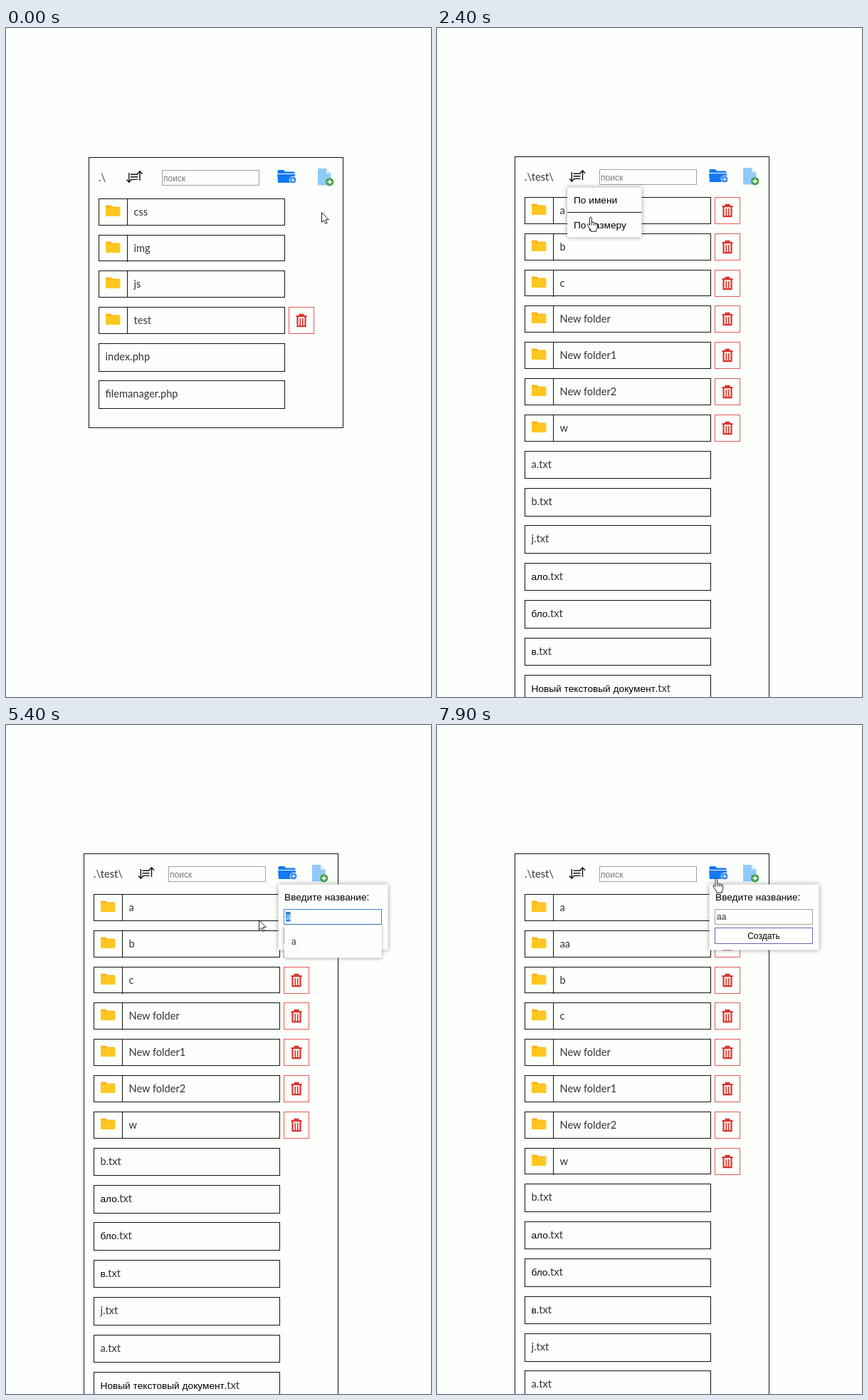
These frames come from a looping animation (597x938 px, 8000 ms). An HTML page:

```html
<!DOCTYPE html>
<html lang="ru">
<head>
<meta charset="utf-8">
<title>File manager</title>
<style>
  html, body { margin: 0; width: 100%; height: 100%; overflow: hidden; background: #fdfffc; }
  svg { display: block; width: 100%; height: 100%; }
  .lat { font: 14.6px Lato, sans-serif; fill: #333; }
  .cyr { font: 13.7px "Liberation Sans", sans-serif; fill: #000; }
  .small { font: 12px "Liberation Sans", sans-serif; fill: #333; }
  .hint { fill: #777; }
  .pop { filter: drop-shadow(0 0 3px #0006); }
  .list { filter: drop-shadow(0 1px 2px #0005); }
</style>
</head>
<body>
<svg viewBox="0 0 597 938">
  <defs>
    <g id="folder">
      <path d="M0 1.5q0-1.5 1.5-1.5h5.5l2 2h9.5q1.5 0 1.5 1.5v9h-20z" fill="#ffb01c"/>
      <path d="M0 4q0-1 1.5-1h17.5q1.5 0 1.5 1v10q0 1.5-1.5 1.5h-17.5q-1.5 0-1.5-1.5z" fill="#ffc720"/>
    </g>
    <g id="trash">
      <rect x=".5" y=".5" width="35" height="37" fill="none" stroke="#e35b56"/>
      <g fill="none" stroke="#d93530" stroke-width="2.2">
        <path d="M10.5 13.2h15M15.5 12v-1.2h5v1.2M12.5 14v13.2h11v-13.2"/>
        <path d="M16.2 16v11M19.8 16v11" stroke-width="1.6"/>
      </g>
    </g>
    <g id="sort" fill="none" stroke="#111" stroke-width="1.4">
      <path d="M3.8 3v13M.5 12.5l3.3 3.7 3.3-3.7M19 14v-13M15.5 4.7l3.5-3.9 3.5 3.9M6 5.2h10M6 8.8h10M6 12.4h10"/>
    </g>
    <g id="newFolder">
      <path d="M.5 2q0-1.5 1.5-1.5h7l2.2 2.5h11.8q1.5 0 1.5 1.5v1h-24z" fill="#1279f2"/>
      <path d="M0 6.5h25l-1 12h-23z" fill="#1279f2"/>
      <circle cx="22" cy="14.6" r="4.9" fill="#2a83ee" stroke="#fff" stroke-width=".9"/>
      <path d="M19.3 14.6h5.4M22 11.9v5.4" stroke="#fff" stroke-width="1.1"/>
    </g>
    <g id="newFile">
      <path d="M0 0h12l6.5 6.5v17h-18.5z" fill="#90caf9"/>
      <path d="M12 0l6.5 6.5h-6.5z" fill="#e1f1fc"/>
      <circle cx="16.7" cy="18.8" r="5.6" fill="#43a047"/>
      <path d="M13.4 18.8h6.6M16.7 15.5v6.6" stroke="#fff" stroke-width="1.8"/>
    </g>
    <path id="arrow" d="M.5.5v14l3.2-3 2.2 5 2.2-1-2.2-4.8h4.4z" fill="#fff" stroke="#222"/>
    <path id="hand" d="M-1.5 11.5V1.5q0-1.5 1.4-1.5t1.4 1.5v6q2.3-1 2.9.6 2-.8 2.6.8 2.4-.4 2.4 1.6v4.2q0 1.6-1.4 3.2v2.3h-7.6v-2.1q-2.3-2.8-4.6-6.4-.8-1.7.7-2.1 1.2 0 2.2 1.9zM1.3 7.5v4M4.2 8.2v3.4M6.8 9v2.8" fill="#fff" stroke="#222"/>
    <path id="beam" d="M-3-6.5h2q1 0 1 1 0-1 1-1h2M0-6v12M-3 6.5h2q1 0 1-1 0 1 1 1h2" fill="none" stroke="#222" stroke-width="1.2"/>
  </defs>
  <g id="scene"></g>
  <use id="cursor"/>
</svg>
<script>
const LOOP = 8000, STEP = 100;
const PAPER = "#fdfffc";
const scene = document.getElementById("scene");
const cursor = document.getElementById("cursor");

const ROOT = {
  x: 117, y: 181, first: 238.8, path: ".\\", bottom: 560,
  sort: 169, input: 219, newFolder: 381, newFile: 438,
  folders: ["css", "img", "js", "test"], locked: ["css", "img", "js"],
  files: ["index.php", "filemanager.php"]
};
const TEST = {
  x: 110, y: 180, first: 237, path: ".\\test\\", bottom: 1000,
  sort: 185.5, input: 228, newFolder: 382, newFile: 430,
  folders: ["a", "b", "c", "New folder", "New folder1", "New folder2", "w"], locked: []
};
const LAST = "Новый текстовый документ.txt";
const BY_SIZE = ["b.txt", "ало.txt", "бло.txt", "в.txt", "j.txt", "a.txt", LAST];
const BY_NAME = ["a.txt", "b.txt", "j.txt", "ало.txt", "бло.txt", "в.txt", LAST];

// time, x, y, pointer shape from that time on
const MOVES = [
  [0, 443, 258, "arrow"], [200, 443, 258, "arrow"],
  [500, 215, 404, "hand"], [800, 203, 404, "arrow"],
  [1100, 213, 229, "arrow"], [1300, 197, 210, "hand"], [1600, 197, 210, "hand"],
  [1800, 226, 232, "hand"], [2000, 226, 232, "hand"],
  [2300, 216, 265, "hand"], [2500, 216, 265, "hand"],
  [2800, 198, 206, "hand"], [2900, 198, 206, "arrow"],
  [3200, 421, 216, "hand"], [3300, 428, 214, "hand"], [3500, 394, 212, "hand"],
  [4100, 394, 212, "hand"], [4200, 410, 268, "beam"], [4300, 402, 268, "beam"],
  [4400, 345, 274, "arrow"], [4500, 298, 278, "arrow"], [5100, 298, 278, "arrow"],
  [5700, 412, 268, "beam"], [7000, 412, 268, "beam"],
  [7200, 465, 293, "hand"], [7300, 465, 293, "hand"],
  [7400, 540, 299, "arrow"], [7500, 512, 300, "arrow"], [7600, 512, 300, "arrow"],
  [7900, 392.5, 215, "hand"]
];

const rect = (x, y, w, h, stroke = "#111", fill = "none") =>
  `<rect x="${x + .5}" y="${y + .5}" width="${w}" height="${h}" stroke="${stroke}" fill="${fill}"/>`;
const icon = (id, x, y) => `<use href="#${id}" x="${x}" y="${y}"/>`;
const line = d => `<path d="${d}" stroke="#111"/>`;
const small = (x, y, s, extra = "") => `<text class="small ${extra}" x="${x}" y="${y}">${s}</text>`;

// Row frame with both edges on whole pixels
function row(x, y, h) {
  const top = Math.round(y);
  return rect(x, top, 261, Math.round(y + h) - top);
}

// Latin and Cyrillic runs use different faces
function label(x, y, s) {
  const runs = s.match(/[а-яё]+(?: [а-яё]+)*|[^а-яё]+/gi);
  const spans = runs.map(r => `<tspan class="${/[а-яё]/i.test(r) ? "cyr" : "lat"}">${r}</tspan>`);
  return `<text x="${x}" y="${y}">${spans.join("")}</text>`;
}

function toolbar(p) {
  return label(p.x + 13, p.y + 33.5, p.path) +
    icon("sort", p.sort, p.y + 19) +
    rect(p.input, p.y + 18, 136, 21, "#a0a0a0") +
    small(p.input + 2, p.y + 34, "поиск", "hint") +
    icon("newFolder", p.newFolder, p.y + 17.5) +
    icon("newFile", p.newFile, p.y + 16);
}

function panel(p, folders, files) {
  const x = p.x + 13;
  const filesTop = p.first + folders.length * 50.8;
  let out = rect(p.x - 1, p.y, 357, p.bottom - p.y) + toolbar(p);
  folders.forEach((name, i) => {
    const y = p.first + i * 50.8, top = Math.round(y);
    out += row(x, y, 36.8) + line(`M${x + 40.5} ${top}v38`) +
      icon("folder", x + 10, top + 9.5) + label(x + 49.5, top + 23.5, name);
    if (!p.locked.includes(name)) out += icon("trash", x + 267, top);
  });
  files.forEach((name, i) => {
    const y = filesTop + i * 52.4;
    out += row(x, y, 38.6) + label(x + 9.5, Math.round(y) + 24, name);
  });
  return out;
}

const sortMenu = () =>
  `<rect class="pop" x="183" y="223.5" width="104.5" height="70" fill="${PAPER}"/>` +
  line("M183 258.5h104.5") + label(192, 246, "По имени") + label(192, 280.5, "По размеру");

function createForm(s) {
  let out = `<rect class="pop" x="382.5" y="223.5" width="154" height="92" fill="${PAPER}"/>` +
    label(391, 246, "Введите название:") +
    rect(390, 258, 137, 21, s.focus ? "#3f7fd0" : "#a0a0a0", PAPER) +
    rect(390, 284, 137, 22, s.created ? "#6a62b8" : "#777", PAPER) +
    `<text class="small" x="459" y="300" text-anchor="middle" style="fill:#000">Создать</text>`;
  if (s.selected) out += `<rect x="393" y="262" width="6.5" height="13.5" fill="#2f80e0"/>`;
  out += `<text class="small" x="393" y="272.5"${s.selected ? ' style="fill:#fff"' : ""}>${s.value}</text>`;
  if (s.caret) out += line(`M${393.5 + 6.5 * s.value.length} 262v13.5`);
  if (s.suggest) {
    out += `<rect class="list" x="390.5" y="281" width="137.5" height="45.5" rx="3" fill="${PAPER}"/>` +
      small(401, 308, "a");
  }
  return out;
}

function stateAt(t) {
  const within = (a, b) => t >= a && t < b;
  const typing = within(6000, 7300);
  return {
    inside: t >= 800,
    menu: within(1400, 2800),
    byName: within(2000, 2500),
    form: t >= 3700,
    focus: within(4200, 7300),
    selected: within(4400, 6000),
    suggest: within(4300, 7000),
    value: t < 7000 ? "a" : "aa",
    caret: typing && (t - 6000) % 1000 < 500,
    created: t >= 7300
  };
}

function build(s) {
  if (!s.inside) return panel(ROOT, ROOT.folders, ROOT.files);
  const [a, ...rest] = TEST.folders;
  const folders = s.created ? [a, "aa", ...rest] : TEST.folders;
  return panel(TEST, folders, s.byName ? BY_NAME : BY_SIZE) +
    (s.menu ? sortMenu() : "") + (s.form ? createForm(s) : "");
}

function moveCursor(t) {
  let i = MOVES.length - 1;
  while (MOVES[i][0] > t) i--;
  const [t0, x0, y0, shape] = MOVES[i];
  const [t1, x1, y1] = MOVES[i + 1] || [LOOP, x0, y0];
  const k = (t - t0) / (t1 - t0);
  cursor.setAttribute("href", "#" + shape);
  cursor.setAttribute("transform", `translate(${x0 + (x1 - x0) * k} ${y0 + (y1 - y0) * k})`);
}

let shown = "";
function draw(now) {
  const t = Math.floor((now % LOOP) / STEP) * STEP;
  const s = stateAt(t), key = JSON.stringify(s);
  if (key !== shown) {
    scene.innerHTML = build(s);
    shown = key;
  }
  moveCursor(t);
}

const start = performance.now();
function tick() {
  draw(performance.now() - start);
  requestAnimationFrame(tick);
}
tick();
</script>
</body>
</html>
```
